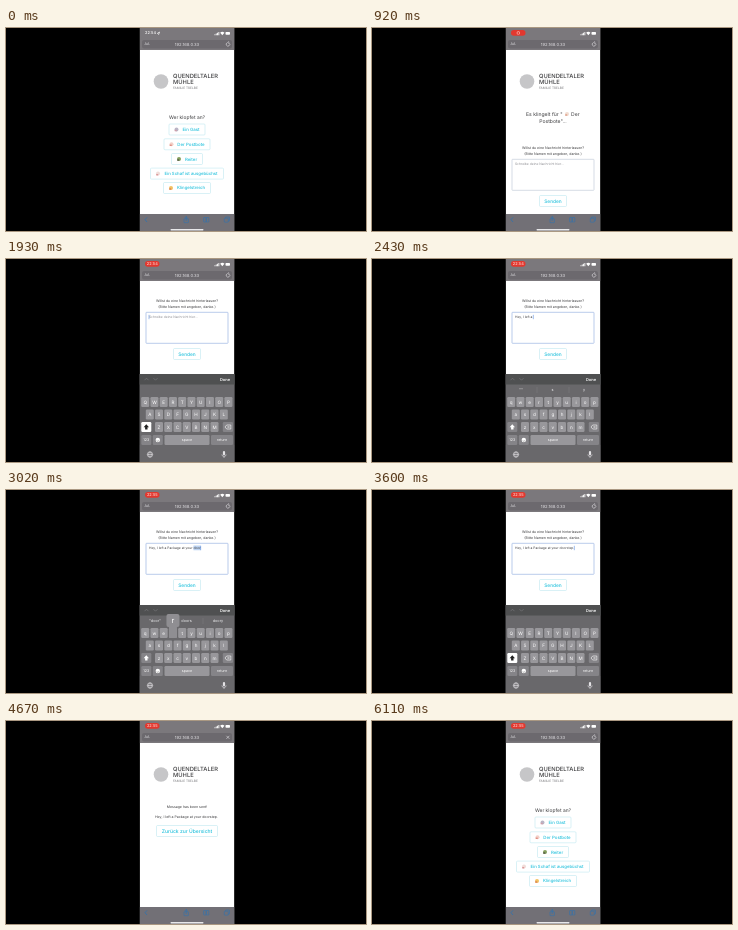
An HTML page with a canvas for the animation above (6.16 s loop, 360 by 203 pixels).

```html
<!DOCTYPE html>
<html lang="de">
<head>
<meta charset="utf-8">
<title>Türklingel</title>
<style>
html, body { margin: 0; width: 100%; height: 100%; overflow: hidden; background: #000; }
canvas { display: block; width: 360px; height: 203px; filter: blur(0.35px); }
</style>
</head>
<body>
<canvas id="stage" width="360" height="203"></canvas>
<script>
const g = document.getElementById('stage').getContext('2d');
const LOOP = 6160;
const LEFT = 133.7, WIDTH = 94.7;
const CYAN = '#22c0dc', INK = '#3c3c3e', BAR = '#7b787c', PALE = '#e4e3e6', BLUE = '#2f73b0';
const MESSAGE = 'Hey, I left a Package at your doorstep.';
const ROWS = [['qwertyuiop', 139.2, 143], ['asdfghjkl', 143.8, 155.5], ['zxcvbnm', 153, 168]];
const STEP = 9.25;

g.textRendering = 'geometricPrecision';
g.textBaseline = 'middle';

const ease = (t, from, to) => {
  const p = Math.min(1, Math.max(0, (t - from) / (to - from)));
  return p * p * (3 - 2 * p);
};
const within = (t, from, to) => t >= from && t < to;

function text(s, x, y, size, color = INK, align = 'center', weight = 400) {
  g.font = `${weight} ${size}px Inter, sans-serif`;
  g.textAlign = align;
  g.fillStyle = color;
  g.fillText(s, x, y);
}

function rect(x, y, w, h, fill, r = 0, stroke) {
  g.beginPath();
  g.roundRect(x, y, w, h, r);
  if (fill) { g.fillStyle = fill; g.fill(); }
  if (stroke) { g.strokeStyle = stroke; g.lineWidth = 0.6; g.stroke(); }
}

function disc(x, y, r, color) {
  g.beginPath();
  g.arc(x, y, r, 0, 7);
  g.fillStyle = color;
  g.fill();
}

function line(color, width, ...points) {
  g.beginPath();
  points.forEach(([x, y]) => g.lineTo(x, y));
  g.strokeStyle = color;
  g.lineWidth = width;
  g.stroke();
}

// Tiny two-tone pictograms standing in for emoji
function icon(x, y, [main, accent]) {
  disc(x, y, 2, main);
  rect(x - 1.9, y + 0.3, 2.2, 1.5, accent, 0.5);
}

function button(label, y, w, size, pressed, colors) {
  const cx = 181;
  rect(cx - w / 2, y - 5.5, w, 11, pressed ? '#13c8f2' : '#fff', 1, pressed ? '#13c8f2' : '#bfe8f0');
  if (colors) icon(cx - w / 2 + 7.5, y, colors);
  text(label, cx + (colors ? 4 : 0), y + 0.2, size, pressed ? '#0b3a4c' : CYAN, 'center', pressed ? 600 : 500);
}

function header() {
  disc(155, 53.5, 7.3, '#c6c6c8');
  text('QUENDELTALER', 167, 48.4, 5.8, INK, 'left', 500);
  text('MÜHLE', 167, 54.2, 5.8, INK, 'left', 500);
  text('FAMILIE TRELBE', 167, 59.8, 3.2, '#77777a', 'left');
}

function homePage(t) {
  header();
  text('Wer klopfet an?', 181, 89.5, 4.9);
  button('Ein Gast', 101.5, 36, 4.4, false, ['#b9b5c6', '#cfa0ab']);
  button('Der Postbote', 116.3, 46, 4.4, within(t, 400, 570), ['#f3d0c8', '#e08f84']);
  button('Reiter', 131, 31, 4.4, false, ['#86a05f', '#565e48']);
  button('Ein Schaf ist ausgebüchst', 145.6, 73, 4.3, false, ['#f0dcd8', '#dc9a9a']);
  button('Klingelstreich', 160, 47, 4.3, false, ['#f2c263', '#de8355']);
}

function ringPage(t, typed) {
  header();
  text('Es klingelt für "', 154, 86, 5.1, INK, 'left');
  icon(195, 86, ['#f1dcd0', '#dfa28c']);
  text('Der', 199, 86, 5.1, INK, 'left');
  text('Postbote"...', 181, 93.3, 5.1);
  text('Willst du eine Nachricht hinterlassen?', 181, 120, 3.5);
  text('(Bitte Namen mit angeben, danke.)', 181, 125.8, 3.5);

  const sent = t >= 3960, focused = t >= 1300;
  if (!sent) rect(140, 131.3, 82, 31, '#fff', 0.6, focused ? '#8ba8de' : '#b9c4d4');
  const shown = MESSAGE.slice(0, typed);
  g.font = '400 3.3px Inter, sans-serif';
  const width = g.measureText(shown).width;
  if (typed > 31 && typed < 36) {
    const start = g.measureText(MESSAGE.slice(0, 30)).width;
    rect(143 + start, 133.6, width - start, 4.6, '#bcd3f2');
  }
  if (typed) text(shown, 143, 136, 3.3, INK, 'left');
  else text('Schreibe deine Nachricht hier...', 143, 136, 3.3, '#8d8d92', 'left');
  if (focused && !sent) line('#3d78d8', 0.5, [143 + width, 133.8], [143 + width, 138.2]);

  button('Senden', 173, 27, 4.8, t >= 3880);
  button('Zurück zur Übersicht', 203, 57, 4.8);
}

function sentPage(t) {
  header();
  text('Message has been sent!', 181, 85.5, 3.5);
  text(MESSAGE, 180.5, 96.3, 3.5);
  button('Zurück zur Übersicht', 110, 61, 5, within(t, 5400, 5560));
}

function topBar(t, loading) {
  rect(LEFT, 0, WIDTH, 22, BAR);
  const recording = t >= 110;
  if (recording) rect(139, 2, 14.5, 5.8, '#e2382f', 2.8);
  if (recording && t < 1700) {
    disc(146.3, 4.9, 1.7, '#f6b5ae');
    disc(146.3, 4.9, 1, '#e2382f');
  } else {
    text(t < 2700 ? '22:54' : '22:55', recording ? 146.3 : 144.5, 5.2, 3.9, recording ? '#fbd5d1' : '#fff', 'center', 500);
    if (!recording) line('#fff', 0.7, [151, 5.7], [153.5, 4], [152.5, 6.8]);
  }
  for (let i = 0; i < 4; i++) rect(208.5 + i * 1.3, 6.2 - i * 0.7, 0.9, 1 + i * 0.7, '#fff');
  g.beginPath();
  g.moveTo(216.3, 7.2);
  g.arc(216.3, 7.2, 3.2, -2.3, -0.84);
  g.fillStyle = '#fff';
  g.fill();
  rect(219.5, 4, 4.5, 2.8, '#fff', 0.8);

  rect(136, 12, 90, 8.5, '#6c696e', 2);
  text('AA', 141, 16.4, 3.6, PALE);
  text('192.168.0.33', 181, 16.3, 4.2, PALE);
  if (loading) {
    line(PALE, 0.6, [220.4, 14.8], [223.4, 17.8]);
    line(PALE, 0.6, [223.4, 14.8], [220.4, 17.8]);
  } else {
    g.beginPath();
    g.arc(222, 16.3, 1.8, -0.6, 4.6);
    g.strokeStyle = PALE;
    g.lineWidth = 0.6;
    g.stroke();
    line(PALE, 0.6, [222, 13.4], [223.2, 14.5], [222, 15.6]);
  }
}

function toolbar() {
  rect(LEFT, 186, WIDTH, 17, '#727076');
  line(BLUE, 0.8, [141, 189.4], [139, 191.7], [141, 194]);
  rect(178, 190.7, 4.4, 4, null, 0.5, BLUE);
  line(BLUE, 0.7, [180.2, 193], [180.2, 188.5]);
  line(BLUE, 0.7, [178.9, 189.8], [180.2, 188.5], [181.5, 189.8]);
  rect(197.6, 189.5, 2.6, 4.5, null, 0.5, BLUE);
  rect(200.2, 189.5, 2.6, 4.5, null, 0.5, BLUE);
  rect(219.5, 189, 4, 4, null, 0.6, BLUE);
  rect(218.3, 190.2, 4, 4, '#727076', 0.6, BLUE);
}

function key(label, x, y, w, size = 4.6, fill = '#98979b', color = '#fff') {
  rect(x - w / 2, y - 5, w, 10, fill, 1.2);
  text(label, x, y + 0.2, size, color);
}

function keyboard(typed, popup) {
  const typing = typed > 0 && typed < MESSAGE.length;
  rect(LEFT, 115, WIDTH, 100, '#69686b');
  rect(LEFT, 115, WIDTH, 10.5, '#4f5051');
  line('#77787a', 0.7, [138.5, 121.2], [140.5, 119.2], [142.5, 121.2]);
  line('#77787a', 0.7, [147.5, 119.2], [149.5, 121.2], [151.5, 119.2]);
  text('Done', 219, 120.4, 4, '#fff', 'center', 600);

  if (typing) {
    const word = MESSAGE.slice(0, typed).split(' ').pop();
    [`"${word}"`, word + 's', word + 'y'].forEach((s, i) => text(s, 149 + i * 31.5, 131, 3.8, '#f0f0f2'));
    for (const x of [165, 197]) line('#858487', 0.4, [x, 128], [x, 134]);
  }

  for (const [letters, x, y] of ROWS)
    [...letters].forEach((c, i) => key(typing ? c : c.toUpperCase(), x + i * STEP, y, 8));

  const shift = typing ? '#858488' : '#fff', arrow = typing ? '#fff' : '#222';
  rect(135.3, 163, 10, 10, shift, 1.2);
  g.beginPath();
  [[140.3, 165.3], [143, 168.2], [141.5, 168.2], [141.5, 170.5], [139.1, 170.5], [139.1, 168.2], [137.6, 168.2]]
    .forEach(p => g.lineTo(...p));
  g.fillStyle = arrow;
  g.fill();
  rect(216.8, 163, 10.2, 10, '#858488', 1.2);
  line('#fff', 0.6, [219, 168], [220.7, 166], [224.8, 166], [224.8, 170], [220.7, 170], [219, 168]);
  line('#fff', 0.5, [221.5, 167], [223.5, 169]);
  line('#fff', 0.5, [223.5, 167], [221.5, 169]);

  key('123', 140.3, 181, 10, 3.6, '#858488');
  rect(146.8, 176, 10, 10, '#858488', 1.2);
  disc(151.8, 181, 2.2, '#fff');
  line('#777', 0.6, [150.7, 181.6], [151.8, 182.3], [152.9, 181.6]);
  key('space', 181, 181, 45, 3.6);
  key('return', 216, 181, 22, 3.6, '#858488');

  g.beginPath();
  g.arc(144, 195.5, 2.7, 0, 7);
  g.moveTo(145.3, 195.5);
  g.ellipse(144, 195.5, 1.3, 2.7, 0, 0, 7);
  g.moveTo(141.3, 195.5);
  g.lineTo(146.7, 195.5);
  g.strokeStyle = PALE;
  g.lineWidth = 0.6;
  g.stroke();
  rect(216.9, 192, 2.2, 4.4, PALE, 1.1);
  g.beginPath();
  g.arc(218, 195.4, 2.1, 0, Math.PI);
  g.moveTo(218, 197.5);
  g.lineTo(218, 199);
  g.stroke();

  for (const [letters, x, y] of ROWS) {
    const i = popup ? letters.indexOf(popup.toLowerCase()) : -1;
    if (i < 0) continue;
    const cx = x + i * STEP;
    rect(cx - 4, y - 8, 8, 13, '#8f8e92', 1.2);
    rect(cx - 6.5, y - 19, 13, 13, '#8f8e92', 2);
    text(popup, cx, y - 12.5, 7.5, '#fff');
  }
}

function draw(t) {
  g.fillStyle = '#000';
  g.fillRect(0, 0, 360, 203);

  // Typing slows down for the last few letters
  const pace = t < 3040 ? (t - 1990) / 30 : 35 + (t - 3060) / 80;
  const typed = Math.max(0, Math.min(MESSAGE.length, Math.floor(pace)));
  const popup = pace >= 1 && pace < MESSAGE.length + 0.7 && pace % 1 < 0.75 ? MESSAGE[typed - 1] : '';
  const lift = ease(t, 1423, 1583) - ease(t, 3963, 4133);
  const scroll = 78 * (ease(t, 1440, 1620) - ease(t, 3980, 4150));

  g.save();
  g.beginPath();
  g.rect(LEFT, 0, WIDTH, 203);
  g.clip();
  rect(LEFT, 0, WIDTH, 203, '#fff');
  g.save();
  g.translate(0, -scroll);
  if (within(t, 570, 4380)) ringPage(t, typed);
  else if (within(t, 4380, 5560)) sentPage(t);
  else homePage(t);
  g.restore();
  toolbar();
  topBar(t, within(t, 500, 700) || within(t, 4300, 4850) || within(t, 5500, 5750));
  g.restore();

  if (lift > 0) {
    g.save();
    g.translate(0, 88 * (1 - lift));
    keyboard(typed, popup);
    g.restore();
  }
  if (lift < 1) rect(164.5, 201, 33, 1.4, '#e8e8ea', 0.7);
}

function frame(now) {
  draw(now % LOOP);
  requestAnimationFrame(frame);
}
requestAnimationFrame(frame);
</script>
</body>
</html>
```
